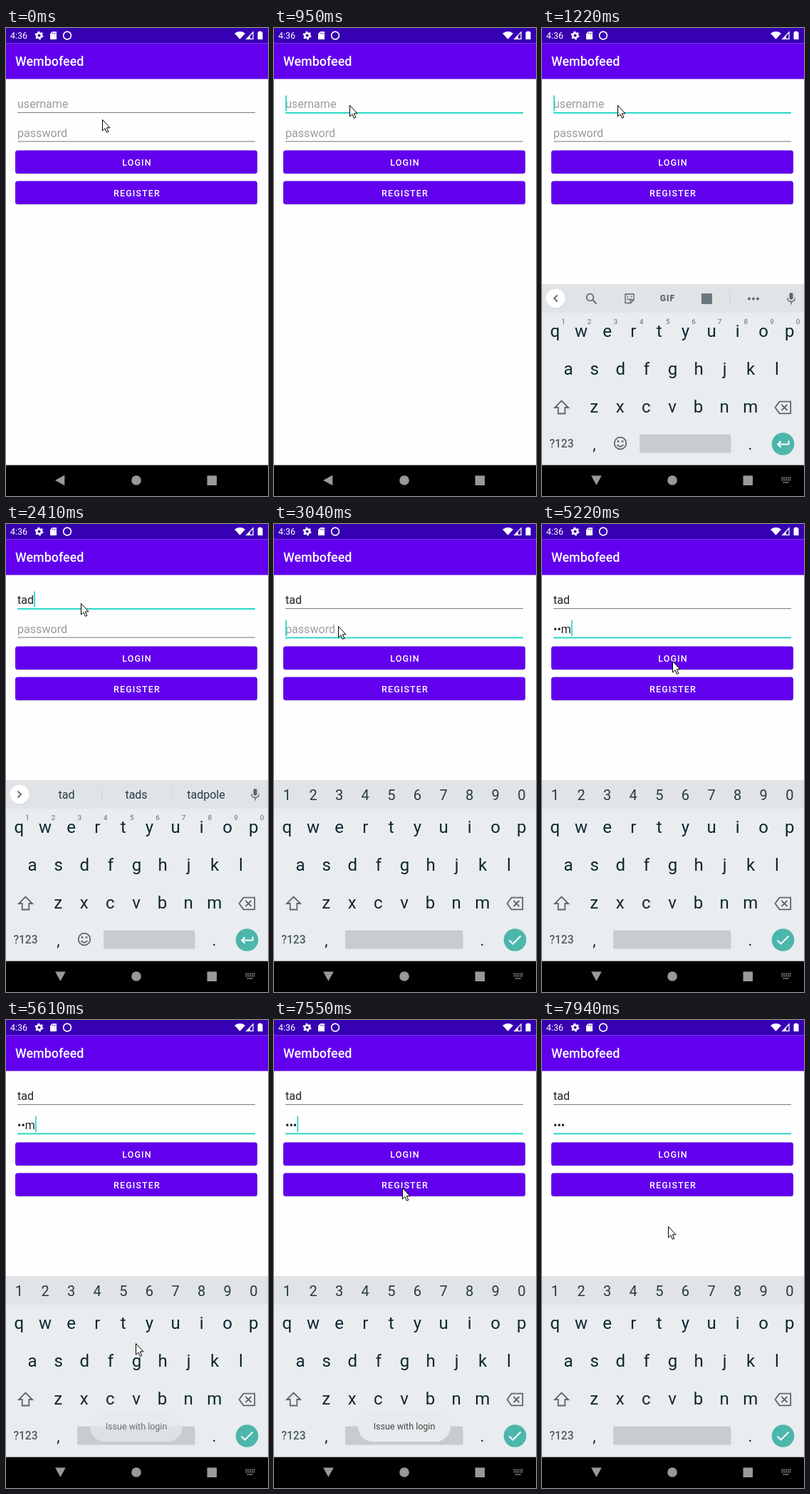
Animation of 368x656 px, one loop 8000 ms. Source, as an HTML page:

```html
<!DOCTYPE html>
<html lang="en">
<head>
<meta charset="utf-8">
<title>Login screen</title>
<style>
  html, body { margin: 0; width: 100%; height: 100%; overflow: hidden; background: #fefefe; }
  svg { display: block; width: 100vw; height: 100vh; font-family: Roboto, sans-serif; }
  text { white-space: pre; }
  .mid { text-anchor: middle; }
  .field { font-size: 16.1px; }
  .label { font-size: 12.5px; font-weight: 500; letter-spacing: 1.12px; fill: #fff; }
  .key { font-size: 24px; fill: #0d2730; }
  .small { font-size: 22px; }
  .line { fill: none; stroke: #5b686e; stroke-width: 1.8; }
  .thin { stroke-width: 1.4; }
</style>
</head>
<body>
<svg id="stage" viewBox="0 0 368 656"></svg>
<script>
const LOOP = 8000;
const BLINK = 500;
const REVEAL = 1500;
const KEY_PITCH = 36.6;
const stage = document.getElementById('stage');
const $ = id => document.getElementById(id);

const label = (x, y, str, cls = '', attrs = '') =>
  `<text class="mid ${cls}" x="${x}" y="${y}" ${attrs}>${str}</text>`;
const rect = (x, y, w, h, fill, attrs = '') =>
  `<rect x="${x}" y="${y}" width="${w}" height="${h}" fill="${fill}" ${attrs}/>`;
const dot = (x, y, r, fill = '#5b686e') => `<circle cx="${x}" cy="${y}" r="${r}" fill="${fill}"/>`;
const row = (chars, x, y, cls, attrs) =>
  [...chars].map((c, i) => label(x + i * KEY_PITCH, y, c, cls, attrs)).join('');

const statusBar = `
  ${rect(0, 0, 368, 21.3, '#3700b3')}
  ${rect(0, 21.3, 368, 50.2, '#6200ee')}
  <text x="6" y="15" font-size="12.5" fill="#fff">4:36</text>
  <g fill="none" stroke="#fff">
    <circle cx="46.5" cy="10.5" r="3.3" stroke-width="2.6"/>
    <circle cx="46.5" cy="10.5" r="5.2" stroke-width="1.6" stroke-dasharray="2.7 2.745"/>
    <circle cx="86" cy="10.5" r="5.4" stroke-width="1.6"/>
    <path d="M347 5.8V15.3H337.8Z" stroke-width="1.3"/>
  </g>
  <g fill="#fff">
    <path d="M65 5H71V16H62V8Z"/>
    <path d="M328.5 15.8L321 7.6Q328.5 2 336 7.6Z"/>
    <path d="M343 10V15.5H337.5Z"/>
    <path d="M355.3 4.5H358.7V5.6H360.5V16H353.5V5.6H355.3Z"/>
  </g>
  <path d="M65.5 6.5V8.5M67.5 6.5V8.5M69.4 6.5V8.5" stroke="#3700b3" stroke-width=".8"/>
  <text x="13" y="53" font-size="17.9" font-weight="500" fill="#fff">Wembofeed</text>`;

const field = (id, y) => `
  <text id="${id}Text" class="field" x="16" y="${y + 18}"></text>
  <rect id="${id}Line" x="16" y="${y + 24}" width="334"/>
  <rect id="${id}Caret" y="${y + 0.5}" width="1.8" height="22" fill="#2fd6c4"/>`;

const button = (id, y, str) => `
  <clipPath id="${id}Clip"><rect x="13" y="${y}" width="340" height="32.6" rx="3.5"/></clipPath>
  ${rect(13, y + 0.8, 340, 32.6, '#000', 'rx="3.5" opacity=".2"')}
  ${rect(13, y, 340, 32.6, '#6200ee', 'rx="3.5"')}
  <circle id="${id}Ripple" cx="183" cy="${y + 17}" fill="#fff" opacity=".2" clip-path="url(#${id}Clip)"/>
  ${label(184, y + 21.2, str, 'label')}`;

const toolbar = `
  ${dot(19, 380, 13.6, '#cfd4d7')}${dot(19, 379, 13.5, '#fff')}
  <path id="chevron" class="line" d="M21.5 374.5L17 379L21.5 383.5"/>
  <g id="tools">
    <circle class="line" cx="67.5" cy="377.5" r="4.8"/>
    <path class="line" d="M71 381L76.5 386.5"/>
    <path class="line thin" d="M117 373H129V381L124.5 385.5H117ZM124.5 385V381H129M119.5 379Q122 382.5 125 379.5"/>
    ${dot(120.5, 376.5, 0.9)}${dot(125.5, 376.5, 0.9)}
    ${label(176.5, 383.2, 'GIF', '', 'font-size="12" font-weight="900" letter-spacing="1" fill="#5b686e"')}
    ${rect(224, 372, 15, 15, '#6d787e', 'rx="1"')}
    ${rect(263.5, 369, 1, 20, '#cfd4d7')}
    ${[291, 297, 303].map(x => dot(x, 379.5, 1.9)).join('')}
  </g>
  <g id="hints" fill="#263a42" font-size="16">
    ${[0, 1, 2].map(i => label(85 + i * 98, 385, '', '', `id="hint${i}"`)).join('')}
    ${rect(134, 369, 1, 20, '#cfd4d7')}${rect(232, 369, 1, 20, '#cfd4d7')}
  </g>
  ${rect(347.4, 371, 5.2, 9.6, '#5b686e', 'rx="2.6"')}
  <path class="line thin" d="M344.8 378.5Q345 383.5 350 383.5T355.2 378.5M350 383.5V387.5"/>`;

const keyboard = `
  ${rect(0, 359, 368, 254, '#e9edf0')}
  ${rect(0, 359, 368, 40, '#e0e4e7')}
  ${row('qwertyuiop', 18.4, 433.3, 'key')}
  ${row('asdfghjkl', 37, 486, 'key')}
  ${row('zxcvbnm', 73.2, 539, 'key')}
  <path class="line" d="M27.5 522.5L37 532H32.3V540.5H22.7V532H18Z"/>
  <path class="line" d="M333.5 523.7H349.2V540.3H333.5L327.5 532ZM336.5 528L344.5 536M344.5 528L336.5 536"/>
  ${label(27.5, 588, '?123', '', 'font-size="15.6" font-weight="500" fill="#4f5d64"')}
  ${label(73.5, 591, ',', 'key small')}${label(292.5, 591, '.', 'key small')}
  <rect id="space" y="569.6" height="26" rx="2.5" fill="#c8cccf"/>
  ${dot(338.5, 583, 15.8, '#4db6ac')}
  <path id="action" fill="none" stroke="#fff" stroke-width="2"/>
  <g id="textKeys">
    ${toolbar}
    ${row('1234567890', 30, 415, '', 'font-size="9.8" fill="#5b686e"')}
    <circle class="line" cx="110" cy="582" r="8.3"/>
    <path class="line" d="M105.5 584Q110 589.5 114.5 584"/>
    ${dot(107, 579.5, 1.4)}${dot(113, 579.5, 1.4)}
  </g>
  <g id="digitKeys">${row('1234567890', 18.4, 387.2, '', 'font-size="20" fill="#263a42"')}</g>`;

const navBar = `
  ${rect(0, 612.7, 368, 44, '#000')}
  <path id="back" d="M69 634L82.3 626.7V641.3Z" fill="#999"/>
  ${dot(183, 634, 6.8, '#999')}
  ${rect(282.5, 627.5, 13.5, 13.5, '#999')}
  <path id="imeIcon" d="M336.5 630.5H350M336.5 633.5H350M339 637H347.5"
    stroke="#8a8a8a" stroke-width="1.8" stroke-dasharray="1.7 1.1"/>`;

const toast = `
  <g id="toast">
    ${rect(118, 549, 130, 42, '#e8ebed', 'rx="21"')}
    ${label(183, 574.3, 'Issue with login', '', 'font-size="12.5" fill="#454545"')}
  </g>`;

stage.innerHTML = `
  ${rect(0, 0, 368, 656, '#fefefe')}
  ${statusBar}
  ${field('user', 94)}${field('pass', 134.5)}
  ${button('login', 171.4, 'LOGIN')}${button('register', 214.4, 'REGISTER')}
  <g id="keyboard">${keyboard}</g>
  ${toast}${navBar}
  <path id="pointer" d="M.5 .5V16L4 12.8L6.4 18.4L8.8 17.4L6.4 11.8H11Z" fill="#fff" stroke="#000" stroke-linejoin="round"/>`;

const inputs = {
  user: { hint: 'username', focus: 950, blur: 2920, word: 'tad', keys: [1770, 1920, 2040] },
  pass: { hint: 'password', focus: 2920, blur: LOOP, word: 'tlm', keys: [3750, 4030, 4180], secret: true }
};
const hints = ['t to the', 'ta take tall', 'tad tads tadpole'].map(line => line.split(' '));

const home = { x: 135, y: 128 };
const moves = [
  { from: 130, to: 640, x: 106, y: 108 },
  { from: 2300, to: 2920, x: 90, y: 143 },
  { from: 4450, to: 4710, x: 149, y: 133 },
  { from: 4710, to: 5200, x: 183, y: 192 },
  { from: 5460, to: 5610, x: 182, y: 453 },
  { from: 5610, to: 6030, x: 226, y: 577 },
  { from: 6030, to: 6300, x: 196, y: 568 },
  { from: 6300, to: 6840, x: 180, y: 235 },
  { from: 7670, to: 7940, x: 177, y: 289 }
];

const ramp = (t, from, to) => Math.min(1, Math.max(0, (t - from) / (to - from)));
const ease = p => p * p * (3 - 2 * p);
const within = (t, from, to) => t >= from && t < to;

function set(id, attrs) {
  for (const key in attrs) $(id).setAttribute(key, attrs[key]);
}

const show = (id, on) => set(id, { display: on ? 'inline' : 'none' });

const typedCount = (input, t) => input.keys.filter(time => time <= t).length;

function fieldValue(input, t) {
  const count = typedCount(input, t);
  const typed = input.word.slice(0, count);
  if (!input.secret || !count) return typed;
  const revealed = t < input.keys[count - 1] + REVEAL;
  return '•'.repeat(count - 1) + (revealed ? typed.at(-1) : '•');
}

function drawField(id, t) {
  const input = inputs[id];
  const value = fieldValue(input, t);
  const focused = within(t, input.focus, input.blur);
  const lastEdit = input.keys[typedCount(input, t) - 1] ?? input.focus;
  const blinkOn = Math.floor((t - lastEdit) / BLINK) % 2 === 0;
  const text = $(id + 'Text');
  text.textContent = value || input.hint;
  text.setAttribute('fill', value ? '#222' : '#9c9c9c');
  set(id + 'Line', focused ? { height: 1.9, fill: '#1fd8c4' } : { height: 1.1, fill: '#858585' });
  set(id + 'Caret', { x: 16 + (value ? text.getComputedTextLength() : 0) });
  show(id + 'Caret', focused && blinkOn);
}

function drawKeyboard(t) {
  const shown = ramp(t, 1000, 1220);
  const secret = t >= 3040;
  const words = hints[typedCount(inputs.user, t) - 1];
  show('keyboard', shown > 0);
  set('keyboard', { opacity: shown, transform: `translate(0 ${(1 - shown) * 50})` });
  show('textKeys', !secret);
  show('digitKeys', secret);
  show('tools', !words);
  show('hints', words);
  words?.forEach((word, i) => $('hint' + i).textContent = word);
  set('chevron', { transform: `rotate(${words ? 180 : 0} 19 379)` });
  set('space', secret ? { x: 100, width: 165.5 } : { x: 137, width: 128.5 });
  set('action', {
    d: secret ? 'M330.5 583.5L335.5 588.5L346.5 577.5' : 'M346.5 578.5V583.5H331.5M335.5 579.2L331.2 583.5L335.5 587.8'
  });
  set('back', { transform: `rotate(${-90 * shown} 76.1 633.7)` });
  set('imeIcon', { opacity: shown });
}

function drawPress(id, t, from, to) {
  set(id + 'Ripple', { r: within(t, from, to) ? 190 * ramp(t, from, from + 200) : 0 });
}

function drawPointer(t) {
  let { x, y } = home;
  for (const move of moves) {
    const p = ease(ramp(t, move.from, move.to));
    x += (move.x - x) * p;
    y += (move.y - y) * p;
  }
  set('pointer', { transform: `translate(${Math.round(x)} ${Math.round(y)})` });
}

function draw(t) {
  drawField('user', t);
  drawField('pass', t);
  drawKeyboard(t);
  drawPress('login', t, 5280, 5600);
  drawPress('register', t, 7600, 7900);
  set('toast', { opacity: ramp(t, 5430, 5690) * (1 - ramp(t, 7580, 7880)) });
  drawPointer(t);
}

const start = performance.now();
function tick() {
  draw((performance.now() - start) % LOOP);
  requestAnimationFrame(tick);
}
tick();
</script>
</body>
</html>
```
